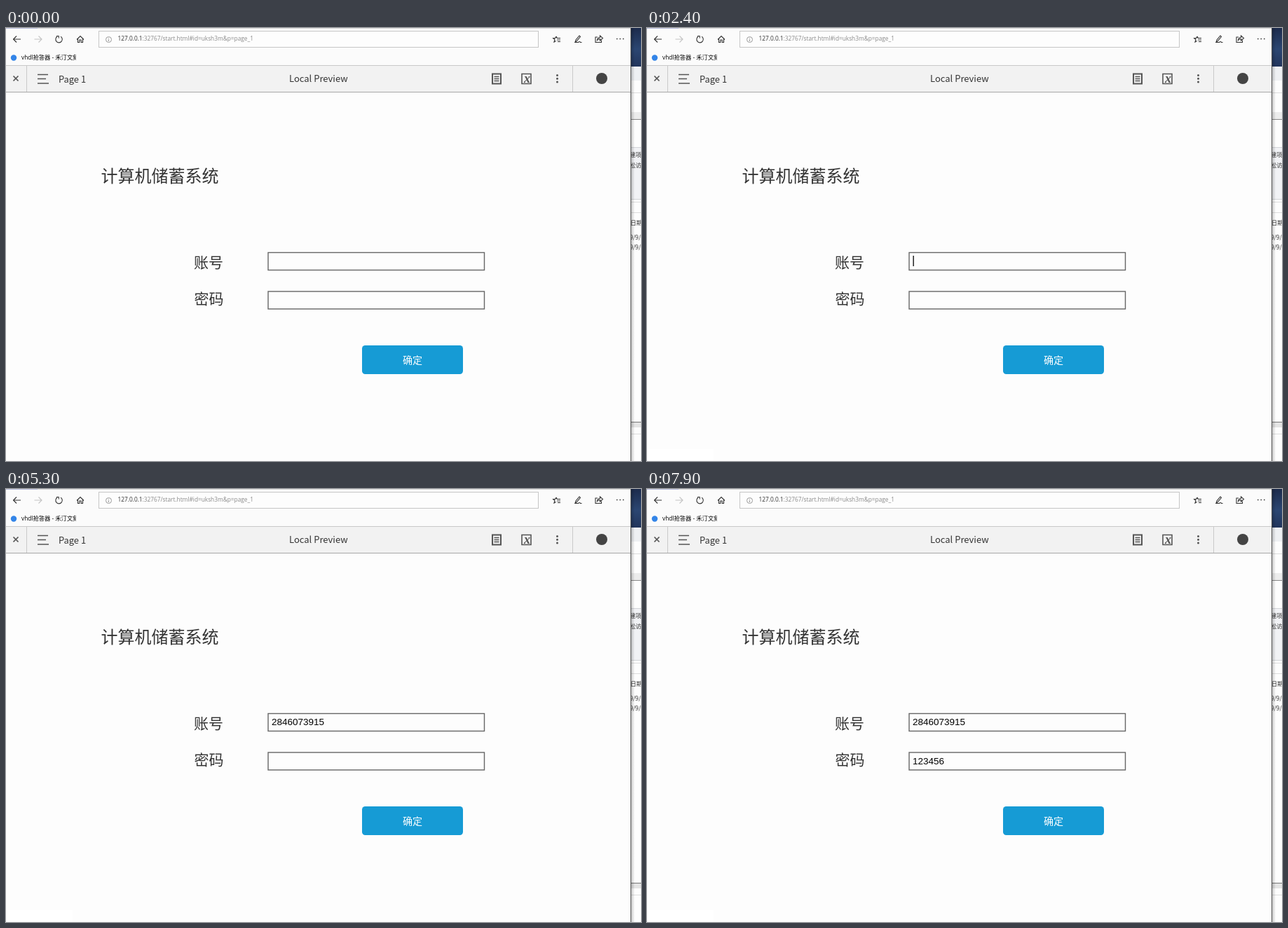
Recreate the animation shown at these times as an HTML page. Size 906x618 px, loop 8000 ms.

```html
<!DOCTYPE html>
<html lang="zh-CN">
<head>
<meta charset="utf-8">
<title>Login form</title>
<style>
  html, body { margin: 0; width: 100%; height: 100%; overflow: hidden; background: #fdfdfd; }
  svg { display: block; }
  text { font-family: "Noto Sans CJK SC", "Noto Sans CJK", sans-serif; fill: #333; white-space: pre; }
  .ui { font-family: "Open Sans", "Noto Sans CJK SC", sans-serif; font-size: 8.3px; }
  .field { font-family: "Liberation Sans", Arial, sans-serif; font-size: 13.5px; fill: #000; }
  .line { fill: none; stroke: #333; stroke-width: 1.1; }
  .bar { fill: none; stroke: #555; stroke-width: 2; }
</style>
</head>
<body>
<svg width="906" height="618" viewBox="0 0 906 618">
  <defs>
    <linearGradient id="sky" x2="0" y2="1">
      <stop stop-color="#1c2b4c"/><stop offset=".55" stop-color="#2b4672"/><stop offset="1" stop-color="#22355c"/>
    </linearGradient>
    <linearGradient id="shade">
      <stop stop-color="#000" stop-opacity=".22"/><stop offset="1" stop-color="#000" stop-opacity="0"/>
    </linearGradient>
    <clipPath id="tab"><path d="M0 34H99.5V52H0z"/></clipPath>
    <clipPath id="strip"><path d="M892 0H906V618H892z"/></clipPath>
  </defs>
  <rect width="906" height="618" fill="#fdfdfd"/>

  <!-- window behind -->
  <g clip-path="url(#strip)">
    <rect x="892" width="14" height="55" fill="url(#sky)"/>
    <path d="M892 55h14v20h-14z" fill="#eef0f3"/>
    <path d="M892 92.5h14M892 248.5h14M892 263.5h14M892 579.5h14" stroke="#ddd"/>
    <path d="M892 120h14v10h-14z" fill="#ececec"/>
    <path d="M892 130.5h14" stroke="#888"/>
    <path d="M892 170h14v74h-14z" fill="#f1f2f5"/>
    <path d="M892 170.5h14M892 244.5h14" stroke="#d2d4d8"/>
    <path d="M892 562.5h14" stroke="#777"/>
    <path d="M892 563h14v7h-14z" fill="#e4e4e4"/>
    <g class="ui">
      <text x="890" y="184">建项</text><text x="890" y="199">松访</text>
      <text x="891" y="281">日期</text>
      <text x="890" y="302">9/9/</text><text x="890" y="316">9/9/</text>
    </g>
    <rect x="892" width="5" height="618" fill="url(#shade)"/>
  </g>

  <!-- browser bar -->
  <rect width="891" height="53" fill="#fbfbfb"/>
  <path d="M0 .5H891" stroke="#d8d8d8"/>
  <path d="M0 .5H45" stroke="#b9bddd"/>
  <path class="line" d="M21 16H10.500M15 11.500L10.500 16L15 20.500"/>
  <path class="line" d="M40.500 16H51M46.500 11.500L51 16L46.500 20.500" style="stroke:#c4c4c4"/>
  <path class="line" d="M73 12.200A4.700 4.700 0 1 0 78 12.100M72 11.500h3.200v3"/>
  <path class="line" d="M101 16.500L106 11.500L111 16.500M102.500 15.500V20.500H104.800V17H107.200V20.500H109.500V15.500"/>
  <rect x="132.500" y="4.500" width="627" height="23" fill="#fdfdfd" stroke="#c6c6c6"/>
  <circle cx="146.500" cy="16.500" r="4" fill="none" stroke="#999"/>
  <path d="M146.500 14v1M146.500 16v3" stroke="#999"/>
  <text class="ui" x="159.500" y="17.500">127.0.0.1<tspan fill="#8a8a8a">:32767/start.html#id=uksh3m&amp;p=page_1</tspan></text>
  <path class="line" d="M785 12l1.300 2.500h4.700M785 12l-1.300 2.500h-3l2.300 2-1 3.500 2.500-1.500M786 17h5M787 19.500h4"/>
  <path class="line" d="M812 20.500l1-3.500 5-6 1.500 1.300-5 6-2.500 2.200h4.500q2-2 3 0h2"/>
  <path class="line" d="M844 13h-3v7.500h8.500v-3M843.500 17.500q.5-4 4-4v-2.500l4 3.500-4 3.500v-2.500q-2.500 0-4 2z"/>
  <path d="M871 15.500h1.500M875.500 15.500h1.500M880 15.500h1.500" stroke="#333" stroke-width="1.500"/>
  <circle cx="11" cy="42.500" r="4.200" fill="#3385e8"/>
  <g clip-path="url(#tab)"><text class="ui" x="22" y="45.300" style="fill:#000">vhdl抢答器 - 禾汀文集</text></g>

  <!-- preview bar -->
  <rect y="53" width="891" height="39" fill="#f2f2f2"/>
  <path d="M0 53.500H891M29.500 54V91M808.500 54V91" stroke="#c9c9c9"/>
  <path d="M0 91.500H891" stroke="#a8a8a8"/>
  <path class="bar" d="M10.500 68.500l7 7M17.500 68.500l-7 7" style="stroke-width:1.700"/>
  <path class="bar" d="M45 66.500H60M45 72.500H57M45 79H61" style="stroke-width:1.700"/>
  <text x="75" y="77.500" font-size="12.900">Page 1</text>
  <text x="404" y="77" font-size="13">Local Preview</text>
  <path class="bar" d="M694 65.500h12v14h-12z"/>
  <path d="M696.500 69.500h7M696.500 72.500h7M696.500 75.500h7" stroke="#555" stroke-width="1.500"/>
  <path class="bar" d="M736 65.500h13v14h-13z" style="stroke-width:1.600"/>
  <text x="739" y="77.500" font-size="18" style="font-family:'Liberation Serif',serif;font-style:italic;font-weight:bold;fill:#555">x</text>
  <g fill="#555"><circle cx="786.500" cy="67.500" r="1.500"/><circle cx="786.500" cy="72.300" r="1.500"/><circle cx="786.500" cy="77" r="1.500"/></g>
  <circle cx="850" cy="72" r="8" fill="#444"/>
  <path d="M891.500 0V618" stroke="#555"/>

  <!-- page -->
  <text x="135.500" y="220" font-size="24">计算机储蓄系统</text>
  <text x="268" y="341.500" font-size="21">账号</text>
  <text x="268.500" y="394" font-size="21">密码</text>
  <g fill="#fdfdfd" stroke="#666" stroke-width="1.400">
    <rect x="374" y="320.500" width="308.500" height="25"/>
    <rect x="374" y="376" width="308.500" height="25"/>
  </g>
  <rect x="508" y="453" width="144" height="41" rx="4.500" fill="#169bd5"/>
  <text x="566" y="478.500" font-size="14" style="fill:#fff">确定</text>
  <text class="field" id="account" x="379" y="337"></text>
  <text class="field" id="password" x="379" y="393"></text>
  <rect id="caret" width="1.300" height="15"/>
  <rect id="status" x="2" y="601" width="93" height="16" fill="#fff"/>
</svg>
<script>
const LOOP = 8000;
const $ = id => document.getElementById(id);
const fields = [
  { el: $('account'), value: '2846073915', top: 325,
    keys: [2600, 2800, 2900, 3000, 3200, 3600, 3800, 4100, 4400, 4600] },
  { el: $('password'), value: '123456', top: 381,
    keys: [6900, 7000, 7100, 7300, 7400, 7500] }
];
// spans in which the caret is lit
const lit = [[900, 1500], [2000, 2500], [2600, 5100], [5600, 6700], [6900, 7900]];

function draw(t) {
  for (const f of fields) {
    const count = f.keys.filter(k => t >= k).length;
    f.el.textContent = f.value.slice(0, count);
    f.end = 379 + count * 13.5 * 0.556;
  }
  const active = fields[t < 6100 ? 0 : 1];
  const caret = $('caret');
  caret.setAttribute('x', active.end + 0.5);
  caret.setAttribute('y', active.top);
  caret.style.opacity = lit.some(([a, b]) => t >= a && t < b) ? 1 : 0;
  $('status').style.opacity = Math.min(4, Math.max(0, Math.floor((t - 100) / 100))) / 4;
}

const start = performance.now();
function tick() {
  draw((performance.now() - start) % LOOP);
  requestAnimationFrame(tick);
}
tick();
</script>
</body>
</html>
```
